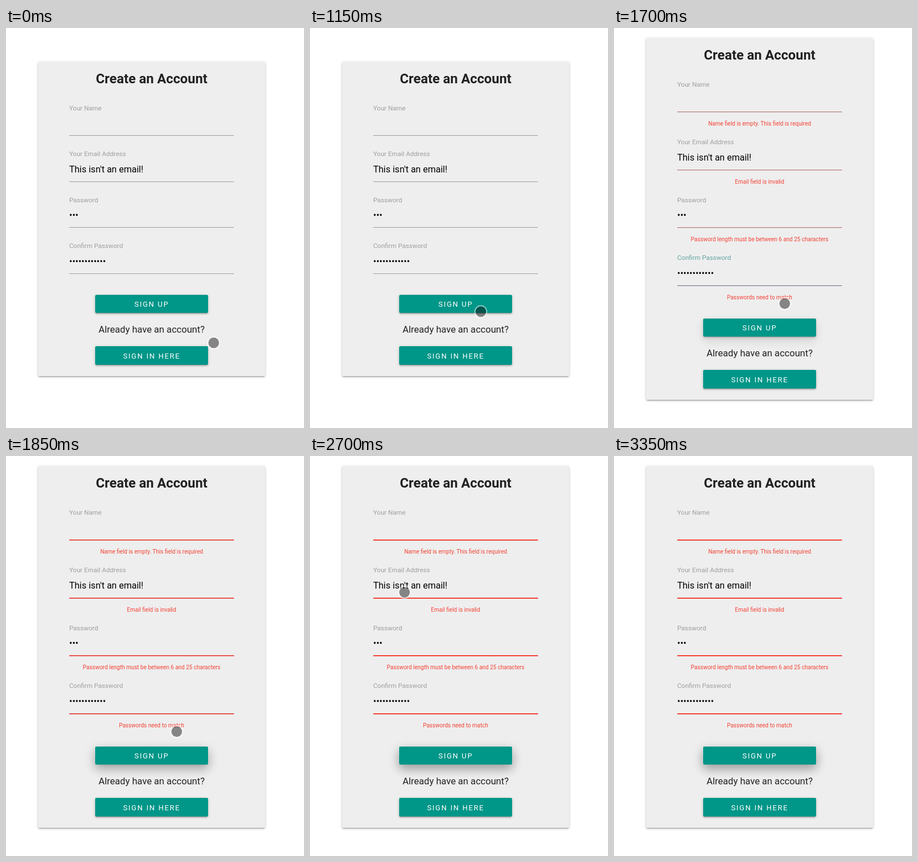
Write an HTML page that moves like this. It is 528 px wide and 709 px high and loops after 4.75 s.

```html
<!DOCTYPE html>
<html lang="en">
<head>
<meta charset="utf-8">
<title>Create an Account</title>
<style>
  html, body { margin: 0; width: 100%; height: 100%; overflow: hidden; background: #fff; }
  .box { position: absolute; border-radius: 2px;
    box-shadow: 0 2px 2px 0 rgba(0,0,0,.14), 0 3px 1px -2px rgba(0,0,0,.12), 0 1px 5px 0 rgba(0,0,0,.2); }
  #card { left: 57px; width: 402px; background: #eee; }
  .btn { left: 158px; width: 200px; height: 32.4px; background: #009688; }
  svg { position: absolute; left: 0; top: 0; }
  text { font-family: Roboto, sans-serif; white-space: pre; }
  .mid { text-anchor: middle; }
  .title { font-size: 23.8px; font-weight: 700; fill: #212121; }
  .label { font-size: 11.6px; }
  .value { font-size: 16px; fill: #000; }
  .error { font-size: 10px; fill: #f44336; }
  .note { font-size: 16.6px; fill: #212121; }
  .cap { font-size: 13.05px; letter-spacing: 1.72px; fill: #fff; }
</style>
</head>
<body>
<div id="card" class="box"></div>
<div id="up" class="box btn"></div>
<div id="in" class="box btn"></div>
<svg id="stage" width="528" height="709" viewBox="0 0 528 709"></svg>
<script>
const LOOP = 4750, STEP = 50;
const FOCUS = 1550, PRESS = 1650, SUBMIT = 1700;
const GRAY = [158, 158, 158], RED = [244, 67, 54];
const FOCUS_LINE = [92, 159, 194], FOCUS_LABEL = [78, 165, 163];

const FIELDS = [
  ['Your Name', '', 'Name field is empty. This field is required'],
  ['Your Email Address', "This isn't an email!", 'Email field is invalid'],
  ['Password', '•'.repeat(3), 'Password length must be between 6 and 25 characters'],
  ['Confirm Password', '•'.repeat(12), 'Passwords need to match']
];

// Where the pointer rests or turns: time, x, y
const SIGN_IN = [368, 558], BELOW = [302.5, 500], SIGN_UP = [302.5, 488.5], GONE = [91, -14];
const PATH = [
  [0, ...SIGN_IN], [400, ...SIGN_IN], [750, 331.5, 573.8], [950, 306, 539.5],
  [1200, ...BELOW], [1400, ...BELOW], [1450, ...SIGN_UP], [2050, ...SIGN_UP],
  [2350, 241.5, 380.5], [2700, 167.5, 241.5], [3150, 91, 30.5], [3350, ...GONE], [LOOP, ...GONE]
];

const $ = id => document.getElementById(id);
const stage = $('stage');

function add(tag, attrs, content = '') {
  const el = document.createElementNS('http://www.w3.org/2000/svg', tag);
  set(el, attrs);
  el.textContent = content;
  return stage.appendChild(el);
}
function set(el, attrs) {
  for (const key in attrs) el.setAttribute(key, attrs[key]);
}
const label = (cls, x, content) => add('text', { class: cls, x }, content);
const bar = () => add('rect', { x: 112, width: 292, height: 1 });
const clamp = v => Math.max(0, Math.min(1, v));
const easeOut = v => 1 - (1 - clamp(v)) ** 2;
const blend = (a, b, k) => a.map((v, i) => Math.round(v + (b[i] - v) * k));
const show = on => ({ visibility: on ? 'visible' : 'hidden' });

const title = label('title mid', 258, 'Create an Account');
const rows = FIELDS.map(([name, value, error]) => ({
  name: label('label', 112, name),
  value: label('value', 112, value),
  line: bar(),
  under: bar(),
  error: label('error mid', 258, error)
}));
const caret = add('rect', { x: 177, y: 403, width: 1, height: 21 });
const upText = label('cap mid', 258.2, 'SIGN UP');
const note = label('note mid', 258, 'Already have an account?');
const inText = label('cap mid', 258.2, 'SIGN IN HERE');
const dot = add('circle', { r: 9.5, fill: '#000', 'fill-opacity': .44 });
const ring = add('circle', { r: 10.5, fill: 'none', stroke: '#fff', 'stroke-width': 2, 'stroke-opacity': .5 });

// Smooth curve through the path that never overshoots a rest or a turn
function speed(i, axis) {
  const [before, here, after] = [PATH[i - 1], PATH[i], PATH[i + 1]];
  if (!before || !after) return 0;
  const a = (here[axis] - before[axis]) / (here[0] - before[0]);
  const b = (after[axis] - here[axis]) / (after[0] - here[0]);
  return a * b > 0 ? 2 * a * b / (a + b) : 0;
}

function along(t, axis) {
  const j = PATH.findIndex(p => p[0] > t), i = j - 1;
  const span = PATH[j][0] - PATH[i][0], k = (t - PATH[i][0]) / span;
  const s = k * k * (3 - 2 * k);
  return PATH[i][axis] * (1 - s) + PATH[j][axis] * s
    + span * k * (1 - k) * ((1 - k) * speed(i, axis) - k * speed(j, axis));
}

function buttonShadow(k) {
  const layer = (geometry, alpha) => `${geometry} rgba(0,0,0,${alpha.toFixed(3)})`;
  return [
    layer('0 2px 2px 0', .14 * (1 - k)), layer('0 3px 1px -2px', .12 * (1 - k)),
    layer('0 1px 5px 0', .2 * (1 - k)),
    layer('0 8px 17px 0', .2 * k), layer('0 6px 20px 0', .19 * k)
  ].join(',');
}

function drawRow(row, i, t, top, sent, warn) {
  const offset = i * (sent ? 102.5 : 81.5);
  const line = Math.round(top + 130.3 + offset);
  const focus = i === 3 ? clamp((t - FOCUS) / 100) : 0;
  const fade = sent ? 1 - clamp((t - PRESS) / 200) : 1;
  const fill = `rgb(${blend(blend(GRAY, FOCUS_LINE, focus), RED, warn)})`;
  set(row.name, { y: Math.floor(top + 86 + offset), fill: `rgb(${blend(GRAY, FOCUS_LABEL, focus * fade)})` });
  set(row.value, { y: line - 16 });
  set(row.line, { y: line, fill });
  set(row.under, { y: line + 1, fill, opacity: Math.max(warn, focus * .3) });
  set(row.error, { y: line + 25, ...show(sent) });
}

function draw(t) {
  const sent = t >= SUBMIT;
  const shift = sent ? 42 : 0, top = 60 - shift;
  const warn = sent ? easeOut((t - PRESS) / 300) : 0;
  $('card').style.top = top + 'px';
  $('card').style.height = 557 + 2 * shift + 'px';
  $('up').style.top = 472.6 + shift + 'px';
  $('in').style.top = 564.2 + shift + 'px';
  $('up').style.boxShadow = buttonShadow(warn);
  set(title, { y: top + 38 });
  rows.forEach((row, i) => drawRow(row, i, t, top, sent, warn));
  set(caret, show(t >= FOCUS + STEP && !sent));
  set(upText, { y: 494 + shift });
  set(note, { y: 540 + shift });
  set(inText, { y: 586 + shift });
  const at = { cx: along(t, 1), cy: along(t, 2) };
  set(dot, at);
  set(ring, at);
}

const start = performance.now();
function tick() {
  const t = (performance.now() - start) % LOOP;
  draw(Math.floor(t / STEP) * STEP);
  requestAnimationFrame(tick);
}
tick();
</script>
</body>
</html>
```
